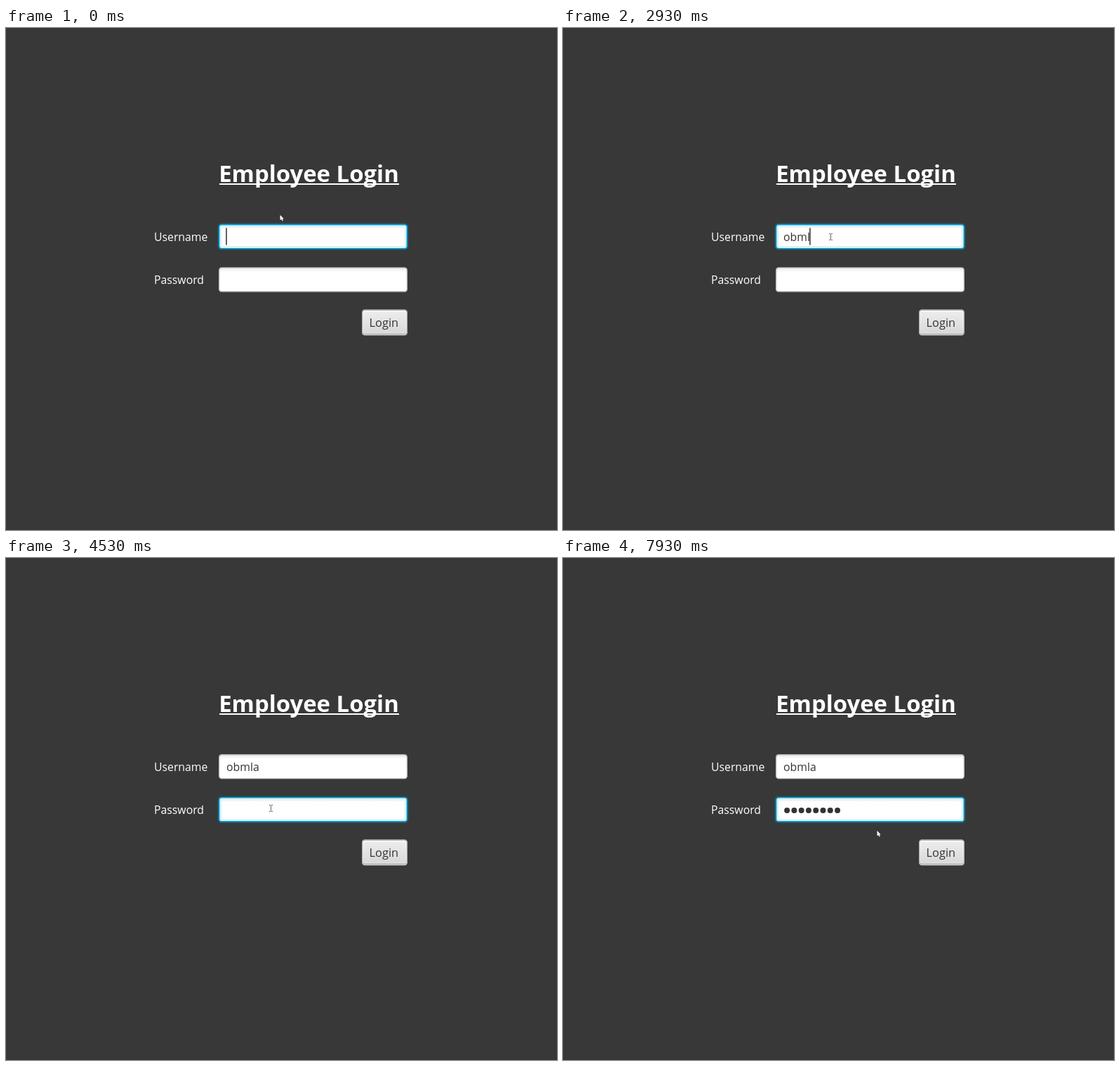
Recreate the animation shown at these times as an HTML page with a canvas. Size 785 by 714 pixels, loop 8000 ms.

```html
<!DOCTYPE html>
<html lang="en">
<head>
<meta charset="utf-8">
<title>Employee Login</title>
<style>
  html, body { margin: 0; width: 100%; height: 100%; overflow: hidden; background: #383838; }
  canvas { display: block; }
</style>
</head>
<body>
<canvas id="stage" width="785" height="714"></canvas>
<script>
const ctx = document.getElementById('stage').getContext('2d');
const FONT = '"Open Sans", "Noto Sans", sans-serif';
const LOOP = 8000, UI_SCALE = 1.42;
const USER_NAME = 'obmla';
const DOT_PITCH = 10.27, TEXT_X = 314;

// All times below are in ticks of 1/15 s.
const userKeys = [27, 31, 41, 44, 47];
const passKeys = [78, 82, 86, 88, 93, 101, 104, 108];
const caretToggles = [1, 9, 16, 24, 39, 41, 54, 62, 68, 70, 77, 78, 115];
const FOCUS_PASSWORD = 68;
const mousePath = [
  [0, 390, 265], [9, 381, 297], [56, 381, 297], [62, 379, 350], [64, 379, 350],
  [66, 377, 356], [117, 377, 356], [118, 405, 368], [119, 447, 387]
];

const userField = { x: 303, y: 279, w: 269, h: 35.3 };
const passField = { x: 303, y: 340.2, w: 269, h: 35.3 };
const button = { x: 507, y: 400.6, w: 65, h: 35.3 };

const countPast = (times, tick) => times.filter(t => t <= tick).length;

function text(str, x, y, size, color, weight = 400) {
  ctx.font = `${weight} ${size}px ${FONT}`;
  ctx.fillStyle = color;
  ctx.fillText(str, x, y);
  return ctx.measureText(str).width;
}

function vertical(y0, y1, from, to) {
  const g = ctx.createLinearGradient(0, y0, 0, y1);
  g.addColorStop(0, from);
  g.addColorStop(1, to);
  return g;
}

function layer({ x, y, w, h }, inset, radius, fill, extraBottom = 0) {
  const d = inset * UI_SCALE;
  ctx.fillStyle = fill;
  ctx.beginPath();
  ctx.roundRect(x + d, y + d, w - 2 * d, h - 2 * d + extraBottom, radius * UI_SCALE);
  ctx.fill();
}

function drawField(f, focused) {
  const inner = vertical(f.y, f.y + 5 * UI_SCALE, '#e8e8e8', '#fff');
  if (focused) {
    layer(f, -0.2, 3, '#039ed3');
    layer(f, 1, 2, '#fff');
    layer(f, -1.4, 4, '#039ed322');
    layer(f, 3, 0, inner);
  } else {
    layer(f, 0, 3, vertical(f.y, f.y + f.h, '#b5b5b5', '#c8c8c8'));
    layer(f, 1, 2, inner);
  }
}

function drawButton(b) {
  const bottom = b.y + b.h;
  layer(b, 0, 3, '#d0d0d0', 1.4);
  layer(b, 0, 3, '#b2b2b2');
  layer(b, 1, 2, vertical(b.y, bottom, '#fdfdfd', '#e2e2e2'));
  layer(b, 2, 1, vertical(b.y, bottom, '#eeeeee', '#d7d7d7'));
  text('Login', 517.5, 424.5, 16.4, '#333');
}

function mouseAt(tick) {
  const next = mousePath.findIndex(k => k[0] > tick);
  if (next < 0) return mousePath.at(-1).slice(1);
  const [t0, x0, y0] = mousePath[next - 1], [t1, x1, y1] = mousePath[next];
  const p = (tick - t0) / (t1 - t0), e = p * p * (3 - 2 * p);
  return [Math.round(x0 + (x1 - x0) * e), Math.round(y0 + (y1 - y0) * e)];
}

function drawMouse(x, y) {
  const over = f => x >= f.x && x <= f.x + f.w && y >= f.y && y <= f.y + f.h;
  if (over(userField) || over(passField)) {
    ctx.fillStyle = '#666';
    ctx.fillRect(x, y - 4, 1, 8);
    for (const edge of [y - 5, y + 4]) {
      ctx.fillRect(x - 2, edge, 2, 1);
      ctx.fillRect(x + 1, edge, 2, 1);
    }
    return;
  }
  const arrow = new Path2D(`M${x + 0.5} ${y + 0.8}v7.8l1.8-1.6 1.4 2.6 1.3-.6-1.3-2.5h2.2z`);
  ctx.strokeStyle = '#222';
  ctx.lineWidth = 1;
  ctx.stroke(arrow);
  ctx.fillStyle = '#fff';
  ctx.fill(arrow);
}

function draw(ms) {
  const tick = Math.floor((ms + 4) * 0.015);
  const inPassword = tick >= FOCUS_PASSWORD;

  ctx.fillStyle = '#383838';
  ctx.fillRect(0, 0, 785, 714);

  text('Employee Login', 303.2, 219, 32.9, '#fff', 700);
  ctx.fillRect(304, 221, 256, 2);
  text('Username', 211, 303, 15.8, '#fff');
  text('Password', 211, 364, 15.8, '#fff');

  drawField(userField, !inPassword);
  drawField(passField, inPassword);
  drawButton(button);

  const typed = USER_NAME.slice(0, countPast(userKeys, tick));
  const nameWidth = text(typed, TEXT_X, 303, 15.8, '#333');

  const dots = countPast(passKeys, tick);
  ctx.fillStyle = '#333';
  for (let i = 0; i < dots; i++) {
    ctx.beginPath();
    ctx.arc(TEXT_X + (i + 0.5) * DOT_PITCH, 359, 4, 0, 7);
    ctx.fill();
  }

  if (countPast(caretToggles, tick) % 2 === 0) {
    const width = inPassword ? dots * DOT_PITCH : nameWidth;
    ctx.fillStyle = '#222';
    ctx.fillRect(TEXT_X + width - 0.7, inPassword ? 345.4 : 284.4, 1.4, 24.2);
  }

  drawMouse(...mouseAt(tick));
}

function loop() {
  draw(performance.now() % LOOP);
  requestAnimationFrame(loop);
}
loop();
</script>
</body>
</html>
```
